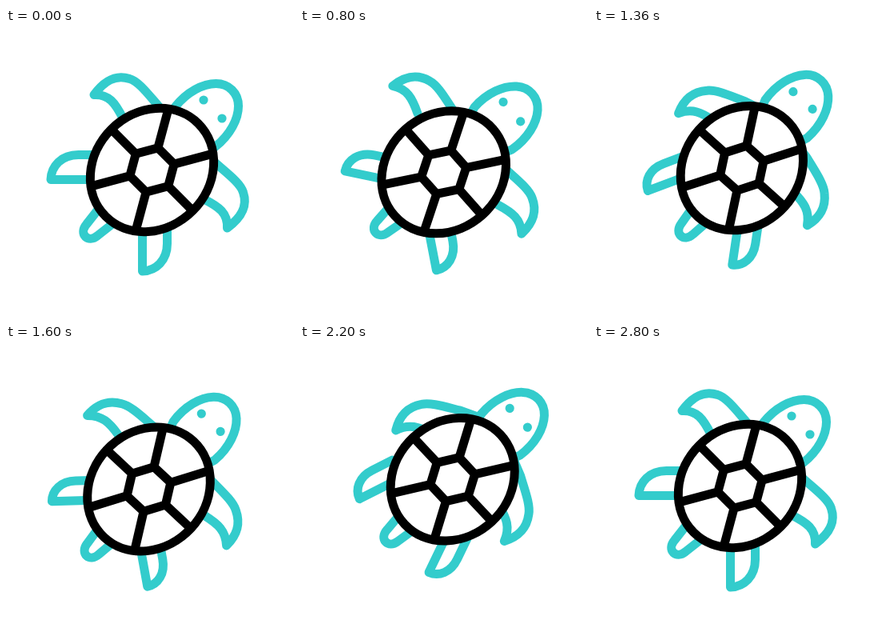
An HTML page with a canvas for the animation above (3 s loop, 360x360 px).

```html
<!DOCTYPE html>
<html lang="en">
<head>
<meta charset="utf-8">
<title>Swimming turtle</title>
<style>
  html, body { margin: 0; width: 100%; height: 100%; overflow: hidden; background: #fff; }
  canvas { display: block; width: 360px; height: 360px; }
</style>
</head>
<body>
<canvas id="stage"></canvas>
<script>
const LOOP = 3000, STEP = 40, SIZE = 360;
const TEAL = '#33cccc', BLACK = '#000', WHITE = '#fff';
const CENTER = { x: 182.5, y: 177.5 };

// Turning points [ms, value]; a sine ease joins each pair.
const DRIFT   = [[200, 0], [570, -12], [1090, 10.5], [1590, -4], [2060, 9], [2800, 0]];
const SWAY    = [[200, 0], [800, 3.4], [1360, -3], [2160, 2], [2800, 0]];
const STROKE  = [[360, 0], [740, 10], [1160, -26], [1720, 3.5], [2220, -29], [2800, 0]];
const FOLD    = [[200, 0], [1200, 1], [2300, 1], [2800, 0]];
const STRETCH = [[200, 0], [480, 4.5], [2000, 4.5], [2800, 0]];

// Shapes are relative to the shell centre; a flipper folds along its axis.
const HEAD = new Path2D('M20 -60 L29 -79 C44 -98 64 -108 80 -108 C96 -108 108 -96 108 -80 C108 -64 98 -44 79 -29 L60 -20');
const TAIL = new Path2D('M-60 40 L-82 68 C-92 80 -80 92 -68 82 L-40 60');
const FRONT = {
  path: new Path2D('M22 -60 L9 -79 C-5 -95 -17 -111 -28 -114 C-46 -120 -60 -111 -72.5 -94 C-54 -95 -46 -84 -36 -64'),
  pivot: [-8, -78], axis: 14, foldedLength: 1.02, foldedWidth: 0.78
};
const BACK = {
  path: new Path2D('M-60 -19 L-92 -19 C-113 -19 -126 -5 -126.5 12 L-60 12'),
  pivot: [-85, 8], axis: 0, foldedLength: 0.88, foldedWidth: 0.8
};

const canvas = document.getElementById('stage');
const ctx = canvas.getContext('2d');
const ratio = window.devicePixelRatio || 1;
canvas.width = canvas.height = SIZE * ratio;

const radians = degrees => degrees * Math.PI / 180;
const mix = (a, b, u) => a + (b - a) * u;

function sample(keys, time) {
  const next = keys.findIndex(([at]) => at > time);
  if (next === 0) return keys[0][1];
  if (next < 0) return keys[keys.length - 1][1];
  const [t0, v0] = keys[next - 1], [t1, v1] = keys[next];
  const u = (time - t0) / (t1 - t0);
  return mix(v0, v1, (1 - Math.cos(Math.PI * u)) / 2);
}

function scoped(draw) {
  ctx.save();
  draw();
  ctx.restore();
}

// Positive angles swing a flipper towards the head.
function drawFlipper(flipper, angle, fold, mirrored) {
  const [x, y] = flipper.pivot, axis = radians(flipper.axis);
  scoped(() => {
    if (mirrored) ctx.transform(0, -1, -1, 0, 0, 0);
    ctx.translate(x, y);
    ctx.rotate(radians(angle));
    const shape = new Path2D();
    const matrix = new DOMMatrix()
      .rotate(flipper.axis)
      .scale(mix(1, flipper.foldedLength, fold), mix(1, flipper.foldedWidth, fold))
      .rotate(-flipper.axis)
      .translate(-x, -y);
    shape.addPath(flipper.path, matrix);
    ctx.stroke(shape);
  });
}

function drawHead(stretch) {
  scoped(() => {
    ctx.translate(stretch, -stretch);
    ctx.stroke(HEAD);
    for (const [x, y] of [[64.5, -87.5], [87.5, -64.5]]) {
      ctx.beginPath();
      ctx.arc(x, y, 5.6, 0, Math.PI * 2);
      ctx.fill();
    }
  });
}

function drawTail(shift) {
  scoped(() => {
    ctx.translate(shift, -shift);
    ctx.stroke(TAIL);
  });
}

function drawShell() {
  ctx.fillStyle = WHITE;
  ctx.strokeStyle = BLACK;
  ctx.lineWidth = 11;
  ctx.lineJoin = 'miter';
  ctx.lineCap = 'butt';
  ctx.beginPath();
  ctx.ellipse(0, 0, 82, 72, -Math.PI / 4, 0, Math.PI * 2);
  ctx.fill();
  ctx.stroke();

  const corners = Array.from({ length: 6 }, (_, i) => {
    const angle = radians(45 + 60 * i);
    return [Math.cos(angle), Math.sin(angle)];
  });
  const hexagon = 28.6, rim = 75;
  ctx.beginPath();
  corners.forEach(([x, y]) => ctx.lineTo(x * hexagon, y * hexagon));
  ctx.closePath();
  corners.forEach(([x, y]) => {
    ctx.moveTo(x * hexagon, y * hexagon);
    ctx.lineTo(x * rim, y * rim);
  });
  ctx.stroke();
}

function draw(time) {
  const drift = sample(DRIFT, time);
  const stroke = sample(STROKE, time);
  const fold = sample(FOLD, time);
  const stretch = sample(STRETCH, time);

  ctx.setTransform(ratio, 0, 0, ratio, 0, 0);
  ctx.fillStyle = WHITE;
  ctx.fillRect(0, 0, SIZE, SIZE);
  ctx.translate(CENTER.x + drift, CENTER.y - drift);
  ctx.rotate(radians(sample(SWAY, time)));

  ctx.strokeStyle = ctx.fillStyle = TEAL;
  ctx.lineWidth = 11;
  ctx.lineCap = ctx.lineJoin = 'round';
  drawFlipper(FRONT, stroke * 1.05, fold, false);
  drawFlipper(FRONT, stroke * 0.8, fold, true);
  drawFlipper(BACK, stroke, fold, false);
  drawFlipper(BACK, stroke * 1.1 + fold * 8, fold, true);
  drawTail(stretch * 0.6);
  drawHead(stretch);
  drawShell();
}

const start = performance.now();
function tick() {
  const time = (performance.now() - start) % LOOP;
  draw(Math.floor(time / STEP) * STEP);
  requestAnimationFrame(tick);
}
tick();
</script>
</body>
</html>
```
